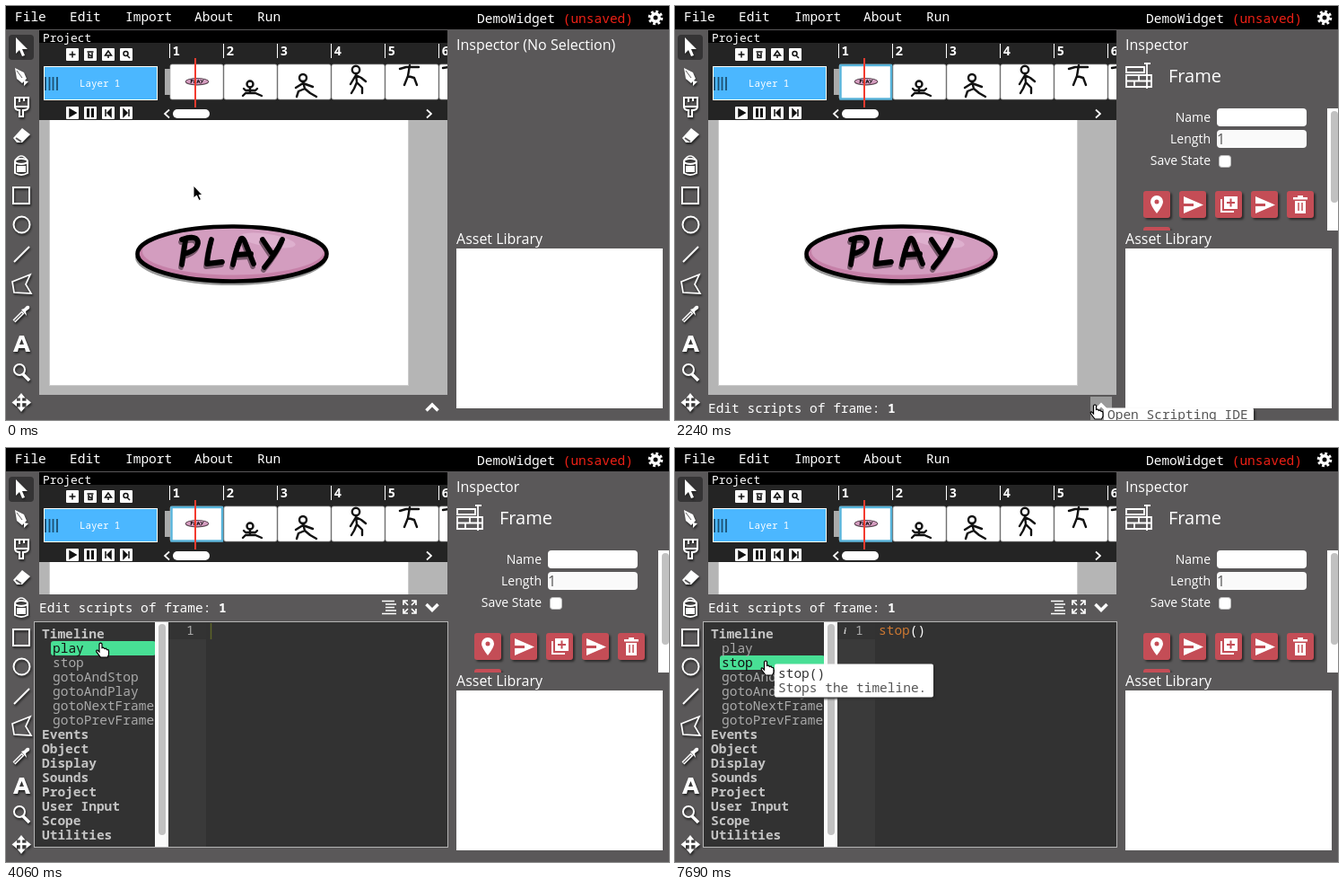
Animation, 739 px wide and 461 px high, one loop 7.8 s. Source, as an HTML page:

```html
<!DOCTYPE html>
<html lang="en">
<head>
<meta charset="utf-8">
<title>Script editor demo</title>
<style>
  html, body { margin: 0; width: 100%; height: 100%; overflow: hidden; background: #5a5859; }
  svg { display: block; width: 739px; height: 461px; }
  text { font: 300 14.5px "Noto Sans Mono", monospace; fill: #fff; white-space: pre; }
  .sans { font: 16px "Open Sans", sans-serif; }
  .label { font: 14px "Open Sans", sans-serif; text-anchor: end; }
  .bold { font-weight: 600; }
  .line { fill: none; stroke: #fff; stroke-width: 2; }
  .cut { fill: none; stroke: #c44d56; stroke-width: 2; }
  .ink { fill: none; stroke: #111; stroke-width: 2.4; stroke-linecap: round; stroke-linejoin: round; }
  .letters { fill: none; stroke-width: 5.8; stroke-linecap: round; stroke-linejoin: round; }
  .tools { filter: drop-shadow(1px 2px 1px #222); }
  .raised { filter: drop-shadow(2px 2px 1px #2b2b2b); }
  .tip text { fill: #555; }
</style>
</head>
<body>
<svg viewBox="0 0 739 461">
  <defs>
    <path id="word" d="M200 261L196 288M196 260Q214 254 214 264Q213 272 199 276M229 260Q225 275 224 287L241 285M253 288Q257 268 262 259Q264 258 266 262Q270 272 276 287M256 277L273 276M286 260L296 275M308 260Q302 274 288 291"/>
    <g id="button">
      <ellipse cx="251" cy="280" rx="107" ry="31" fill="#999"/>
      <ellipse cx="252" cy="276" rx="105.5" ry="30.5" fill="#c680a8"/>
      <ellipse cx="253" cy="273" rx="101" ry="26.5" fill="#d39dbf"/>
      <ellipse cx="292" cy="261" rx="31" ry="7" fill="#deb0ce" transform="rotate(9 292 261)"/>
      <ellipse cx="252" cy="276" rx="105.5" ry="30.5" fill="none" stroke="#000" stroke-width="4.600"/>
      <use href="#word" class="letters" stroke="#76576a" x="-1" y="3"/>
      <use href="#word" class="letters" stroke="#000"/>
    </g>
    <clipPath id="timelineClip"><rect x="37" y="27" width="455" height="100"/></clipPath>
    <clipPath id="inspectorClip"><rect x="492" y="26" width="247" height="224"/></clipPath>
  </defs>

  <rect width="739" height="461" fill="#5a5859"/>
  <rect width="739" height="26" fill="#000"/>
  <text x="10" y="17">File</text><text x="71" y="17">Edit</text><text x="133" y="17">Import</text>
  <text x="210" y="17">About</text><text x="280" y="17">Run</text>
  <text x="525" y="19">DemoWidget <tspan fill="#ee2015">(unsaved)</tspan></text>
  <g transform="translate(724 13)">
    <circle r="6.8" fill="none" stroke="#fff" stroke-width="3" stroke-dasharray="2.8 2.54"/>
    <circle r="4.2" class="line" style="stroke-width:3.4"/>
  </g>

  <!-- toolbar -->
  <rect x="3" y="32" width="28" height="28" rx="4" fill="#353435"/>
  <g class="tools" fill="#fff">
    <path d="M11 35V53L15 49L18 56L21 55L18 48H24Z"/>
    <path d="M10 69L20 74L23 81L18 86L12 81ZM20 83L25 84L20 89Z"/>
    <path d="M12 72L18 80" stroke="#5a5859"/>
    <path d="M10 112V102H25V112ZM15 102V107M20 102V106M10 112Q10 116 15 116V123H19V116Q25 116 25 112" class="line"/>
    <path d="M8 147L18 136L27 143L18 152H12Z"/>
    <path d="M11 147L17 151" stroke="#5a5859" stroke-width="2"/>
    <path d="M10 173V186Q17 190 24 186V173" class="line"/>
    <ellipse cx="17" cy="173" rx="7" ry="3" class="line"/><path d="M10 172Q17 162 24 172" class="line" style="stroke-width:1.5"/>
    <rect x="12" y="178" width="10" height="7"/>
    <rect x="8" y="202" width="18" height="18" class="line"/>
    <circle cx="17.500" cy="243.500" r="9" class="line"/>
    <path d="M9 285L26 268" class="line"/>
    <path d="M7 307L27 299L22 310L28 320L9 319Z" class="line" style="stroke-width:1.7"/>
    <path d="M9 351L19 341" class="line" style="stroke-width:4"/><path d="M9.500 350.500L18 342" stroke="#5a5859" stroke-width="1.2"/>
    <path d="M17 338L23 345L22 340L26 337Q27 333 23 334L20 337Z"/>
    <path d="M8 385L15 367H20L27 385H22L21 381H14L13 385ZM15 377H20L17.500 371Z" fill-rule="evenodd"/>
    <circle cx="15" cy="405" r="6" class="line"/><path d="M19 410L26 417" class="line" style="stroke-width:3.5"/>
    <path d="M17 434V449M10 441H25" class="line" style="stroke-width:2.5"/>
    <path d="M17 431L21.500 436.500H12.500ZM17 452L21.500 446.500H12.500ZM6.500 441.500L12 437V446ZM28 441.500L22.500 437V446Z"/>
  </g>

  <!-- stage -->
  <rect x="37" y="127" width="455" height="306" fill="#b5b5b5"/>
  <rect x="48.500" y="120" width="400" height="302.500" fill="#fff" stroke="#ccc"/>
  <use href="#button"/>

  <!-- timeline -->
  <g clip-path="url(#timelineClip)">
    <rect x="37" y="27" width="455" height="100"/>
    <rect x="37" y="41" width="455" height="86" fill="#242424"/>
    <text x="41" y="40" style="font-size:12.900px">Project</text>
    <rect x="42.500" y="67.500" width="126" height="37" fill="#4bb7ff" stroke="#fff"/>
    <path d="M44 79V94M48.500 79V94M52.500 79V94M57 79V94" stroke="#1c4f70" stroke-width="1.800"/>
    <text x="82" y="90" style="font-size:10.800px">Layer 1</text>
    <rect x="177" y="70" width="6" height="29" fill="#aaa"/>
    <g id="cells"></g>
    <use href="#button" transform="translate(213 84.300) scale(.122) translate(-252 -277)"/>
    <g class="ink">
      <circle cx="272" cy="87" r="3.5"/><path d="M272 91V97M265 92L267 94H278L280 92M264 100L267 97H278L285 100"/>
      <circle cx="331" cy="80" r="4"/><path d="M331 84L333 92M323 91L331 86L342 90M324 101L326 95L333 92L339 97L346 101"/>
      <circle cx="390" cy="71" r="4.200"/><path d="M390 75L391 85M384 87L390 77L396 80L401 84M385 97L388 92L391 85L397 91V97"/>
      <path d="M439 70L446 68H460M450 66L448 78M444 88L448 78L455 80L458 88M487 69L493 68"/>
    </g>
    <rect id="selected" x="184.500" y="66" width="56.500" height="37.500" fill="none" stroke="#56b3da" stroke-width="2.400"/>
    <path d="M211 58V113" stroke="#f33b2f" stroke-width="2"/>
    <g id="miniButtons"></g>
    <rect x="186" y="115" width="41" height="10" rx="5" fill="#fff"/>
    <path d="M182 115.500L177 120L182 124.500M469 115.500L474 120L469 124.500" class="line" style="stroke-width:1.700"/>
  </g>

  <text id="status" x="37" y="453">Edit scripts of frame: <tspan class="bold">1</tspan></text>
  <rect id="openHover" x="463" y="435" width="24" height="26" fill="#999"/>
  <path d="M468.500 450.500L475 444L481.500 450.500" class="line" style="stroke-width:3.5"/>

  <!-- inspector -->
  <text x="502" y="49" class="sans">Inspector<tspan id="noSelection"> (No Selection)</tspan></text>
  <g id="inspector" clip-path="url(#inspectorClip)">
    <path d="M503 68H523V74H503ZM503 77H531V90H503ZM503 83.500H531M512 83V90M517 77V83M526 64V92M523 64H530" class="line" style="stroke-width:1.800"/>
    <text x="550" y="85" class="sans" style="font-size:20px">Frame</text>
    <text x="597" y="129" class="label">Name</text><text x="597" y="153" class="label">Length</text><text x="597" y="177" class="label">Save State</text>
    <rect x="604" y="114" width="100" height="20" rx="4" fill="#fff"/>
    <rect x="604" y="138" width="100" height="20" rx="4" fill="#fafafa"/>
    <text x="604" y="154" class="sans" style="fill:#555">1</text>
    <rect x="606.500" y="166.500" width="13" height="13" rx="3" fill="#fff" stroke="#bbb"/>
    <g id="actions" class="raised"></g>
    <g fill="#fff">
      <path d="M537 231Q530 222 530 218A7 7 0 0 1 544 218Q544 222 537 231ZM537 215.500A2.500 2.500 0 1 0 537 220.500A2.500 2.500 0 1 0 537 215.500Z" fill-rule="evenodd"/>
      <path id="send" d="M567 212L589 221.500L567 231V223H578V220H567Z"/><use href="#send" x="80"/>
      <path d="M612 212H627V226H612Z"/><path d="M619.500 214.500V223.500M615 219H624" class="cut"/>
      <path d="M609 215V229H623" class="line"/>
      <path d="M691 217H703V231H691ZM689 213H705V215.500H689ZM694 211H700V213H694Z"/>
      <path d="M695 219V228M699 219V228" class="cut" style="stroke-width:1.500"/>
    </g>
    <rect x="727" y="114" width="12" height="136" fill="#fff"/>
    <rect x="731" y="117" width="8" height="102" rx="4" fill="#c1c1c1"/>
  </g>
  <text x="502" y="265" class="sans">Asset Library</text>
  <rect x="502" y="270" width="230" height="178" fill="#fff"/>

  <!-- script panel -->
  <g id="panel">
    <rect x="37" y="163" width="455" height="298" fill="#5a5859"/>
    <text x="37" y="183">Edit scripts of frame: <tspan class="bold">1</tspan></text>
    <path d="M419 170.500H433M423 174H435M423 177.500H433M423 181H435M419 184.500H435" class="line" style="stroke-width:1.600"/>
    <path d="M443 175V170H448M452 170H457V175M457 179V184H452M448 184H443V179M443 170L448 175M457 170L452 175M457 184L452 179M443 184L448 179" class="line" style="stroke-width:1.700"/>
    <path d="M468.500 174L475 180.500L481.500 174" class="line" style="stroke-width:3.5"/>
    <rect x="31.500" y="193.500" width="461" height="251" fill="#323232" stroke="#b5b5b5"/>
    <rect x="181" y="194" width="42" height="250" fill="#3a3a3a"/>
    <rect x="181" y="194" width="42" height="19" fill="#333"/>
    <text x="201" y="208" style="fill:#aaa">1</text>
    <text id="info" x="188" y="207" style="font:italic bold 11px 'Liberation Serif',serif;fill:#ccc">i</text>
    <text id="code" x="227" y="208" style="fill:#cc7832">stop<tspan fill="#fff">()</tspan></text>
    <path id="dimCaret" d="M228.500 195V213" stroke="#5d6428" stroke-width="1.500"/>
    <path id="caret" d="M278 194V213" stroke="#91ff00" stroke-width="2"/>
    <rect id="hover" height="16" rx="3" fill="#48df95"/>
    <g id="closedTree"></g>
    <g id="openTree"></g>
    <g id="treeBar">
      <rect x="166" y="194" width="15" height="250" fill="#fafafa"/>
      <rect x="170" y="196" width="8" height="235" rx="4" fill="#c1c1c1"/>
    </g>
  </g>

  <g id="openTip" class="tip raised">
    <rect width="167" height="37" rx="2" fill="#fff"/><text x="4" y="12">Open Scripting IDE</text>
  </g>
  <g id="stopTip" class="tip raised">
    <rect width="177" height="37" rx="2" fill="#fff"/>
    <text x="4" y="15" style="fill:#333">stop()</text><text x="4" y="31">Stops the timeline.</text>
  </g>

  <g id="cursor">
    <path id="arrow" d="M0 0V14L3.500 11L6 16.500L8.500 15.500L6 10.500H10Z" stroke="#fff"/>
    <path id="move" d="M0 -7L3 -3.500H1V-1H3.500V-3L7 0L3.500 3V1H1V3.500H3L0 7L-3 3.500H-1V1H-3.500V3L-7 0L-3.500 -3V-1H-1V-3.500H-3Z" stroke="#fff" stroke-width="2" paint-order="stroke"/>
    <path id="hand" d="M-1.500 1Q0 -1 1.500 1V5.500L3 5L4.500 6.500L6 6L7 7.500L8.500 7.500L9 9V13L7.500 16H0L-4.500 10Q-5.500 7.500 -3.500 8L-1.500 10Z" fill="#fff" stroke="#000" stroke-width="1.200"/>
  </g>
</svg>
<script>
const LOOP = 7800;
const el = id => document.getElementById(id);
const repeat = (n, draw) => Array.from({ length: n }, (_, i) => draw(i)).join('');

el('cells').innerHTML = repeat(6, i => {
  const x = 182.5 + 60 * i;
  return `<path d="M${x} 42V58" stroke="#fff"/>
    <text x="${x + 3}" y="55" class="bold">${i + 1}</text>
    <rect x="${x + .5}" y="65" width="59" height="39" rx="2" fill="#fff" stroke="#aaa" stroke-width=".7"/>`;
});

const miniGlyphs = [
  'M3.500 7H10.500M7 3.500V10.500', 'M3.500 4H10.500M5 5V10.500H9V5M6 7L8 9', 'M7 3L3.500 8H10.500ZM7 8V11', 'M9 6A2.500 2.500 0 1 0 4 6A2.500 2.500 0 1 0 9 6M8 8L11 11',
  'M4 3L11 7L4 11Z', 'M4.500 2V12M9.500 2V12', 'M4 3V11M10 3L6 7L10 11Z', 'M10 3V11M4 3L8 7L4 11Z'
];
el('miniButtons').innerHTML = miniGlyphs.map((d, i) => {
  const playback = i > 3;
  return `<g transform="translate(${67 + i % 4 * 20} ${playback ? 112 : 47})">
    <rect width="14" height="14" rx="1" fill="#fff"/>
    <path d="${d}" fill="${playback ? '#111' : 'none'}" stroke="#111" stroke-width="${i === 5 ? 3 : 1.5}"/></g>`;
}).join('');

el('actions').innerHTML = repeat(6, i =>
  `<rect x="${522 + i % 5 * 40}" y="${i < 5 ? 206 : 246}" width="30" height="30" rx="3" fill="#c44d56"/>`);

const topics = ['Timeline', 'Events', 'Object', 'Display', 'Sounds', 'Project', 'User Input', 'Scope', 'Utilities'];
const methods = ['play', 'stop', 'gotoAndStop', 'gotoAndPlay', 'gotoNextFrame', 'gotoPrevFrame'];
const openRows = [topics[0], ...methods, ...topics.slice(1)];
const isMethod = name => methods.includes(name);
const drawTree = names => names.map((name, i) =>
  `<text x="${isMethod(name) ? 52 : 40}" y="${212 + 16 * i}" class="${isMethod(name) ? '' : 'bold'}">${name}</text>`).join('');
el('closedTree').innerHTML = drawTree(topics);
el('openTree').innerHTML = drawTree(openRows);

const show = (id, on) => { el(id).style.display = on ? '' : 'none'; };
const place = (id, x, y) => el(id).setAttribute('transform', `translate(${x} ${y})`);
const smooth = p => p * p * (3 - 2 * p);
const easeOut = p => 1 - (1 - p) ** 2;

// Cursor moves advance in discrete steps; the first lands at start, the last at end.
const moves = [
  { start: 290, end: 810, steps: 10, ease: smooth, path: [[0, 209, 200], [1, 208, 91]] },
  { start: 1400, end: 2130, steps: 14, ease: smooth, path: [[0, 208, 91], [1, 468, 444]] },
  { start: 2660, end: 3410, steps: 14, ease: smooth, path: [[0, 468, 444], [8 / 14, 157, 205], [1, 108, 206]] },
  { start: 4000, end: 4520, steps: 10, ease: easeOut, path: [[0, 108, 206], [1, 101, 237]] }
];

function cursorAt(t) {
  const move = moves.filter(m => t >= m.start).pop();
  if (!move) return [209, 200];
  const { start, end, steps, ease, path } = move;
  const step = Math.floor((t - start) / (end - start) * (steps - 1) + 1e-6) + 1;
  const p = Math.min(step, steps) / steps;
  const i = path.findIndex((point, k) => k && p <= point[0]);
  const [p0, x0, y0] = path[i - 1], [p1, x1, y1] = path[i];
  const e = ease((p - p0) / (p1 - p0));
  return [x0 + (x1 - x0) * e, y0 + (y1 - y0) * e];
}

function render(t) {
  const [x, y] = cursorAt(t);
  const picked = t >= 1230, panel = t >= 2480, expanded = t >= 3770, typed = t >= 5060;

  show('selected', picked);
  show('inspector', picked);
  show('noSelection', !picked);
  show('status', picked);
  show('openHover', t >= 2190 && !panel);
  show('openTip', t >= 2240 && t < 2660);
  place('openTip', 478, 447.5);

  show('panel', panel);
  show('closedTree', !expanded);
  show('openTree', expanded);
  show('treeBar', expanded);

  const rows = expanded ? openRows : topics;
  const tree = el(expanded ? 'openTree' : 'closedTree');
  const row = panel && x < 181 ? Math.floor((y - 199) / 16) : -1;
  const name = rows[row];
  show('hover', name);
  [...tree.children].forEach((label, i) => {
    const method = isMethod(rows[i]);
    label.style.fill = i === row ? (method ? '#111' : '#6d7772') : method ? '#aaa' : '#c4c4c4';
  });
  if (name) {
    const left = isMethod(name) ? 50 : 38;
    el('hover').setAttribute('x', left);
    el('hover').setAttribute('y', 199 + 16 * row);
    el('hover').setAttribute('width', (expanded ? 167 : 181) - left);
  }
  show('stopTip', name === 'stop');
  place('stopTip', x + 10, y + 3.5);

  show('code', typed);
  show('info', t >= 5710);
  show('dimCaret', !typed);
  show('caret', typed && [5060, 5590, 6070, 6670, 7090, 7690].filter(at => t >= at).length % 2);

  const onCell = !panel && x > 183 && y > 65 && y < 104;
  const onLink = t >= 2130 && t < 2660 || name;
  show('move', onCell);
  show('hand', onLink);
  show('arrow', !onCell && !onLink);
  place('cursor', x, y);
}

const began = performance.now();
function tick() {
  render((performance.now() - began) % LOOP);
  requestAnimationFrame(tick);
}
tick();
</script>
</body>
</html>
```
